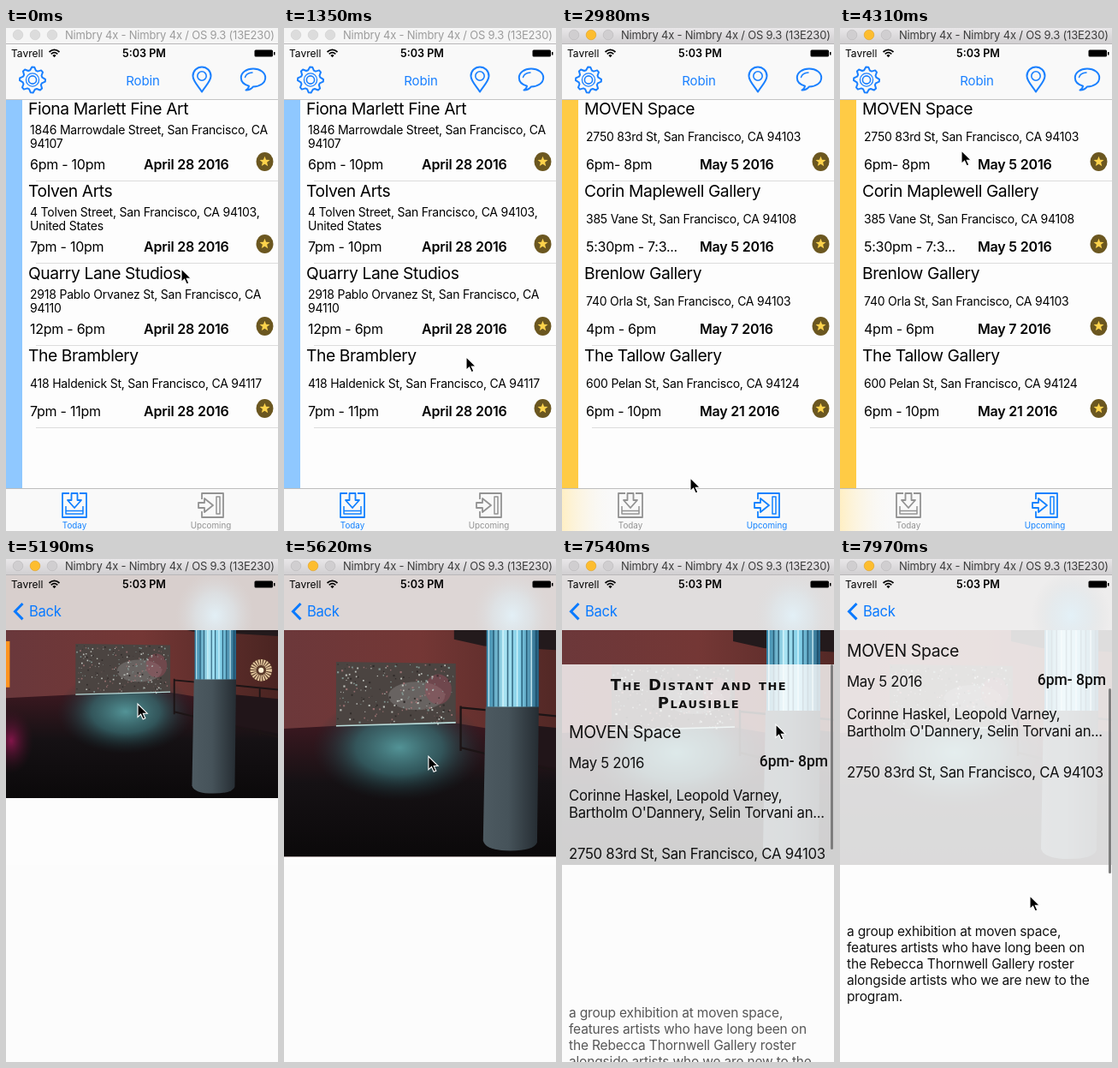
These frames come from a looping animation (318x587 px, 8 s). An HTML page:

```html
<!DOCTYPE html>
<html lang="en">
<head>
<meta charset="utf-8">
<title>Gallery openings app</title>
<style>
html, body { margin: 0; width: 100%; height: 100%; overflow: hidden; background: #fdfdfd; }
svg { display: block; width: 318px; height: 587px; }
text { font-family: Inter, "Liberation Sans", sans-serif; white-space: pre; }
.win { font-size: 13px; letter-spacing: -.2px; }
.net { font-size: 12px; }
.clock { font-size: 12.6px; font-weight: 600; text-anchor: middle; }
.user { font-size: 15px; letter-spacing: -.1px; text-anchor: middle; fill: #1a80ff; }
.back { font-size: 16.6px; letter-spacing: -.3px; fill: #0a7aff; }
.head { font-size: 19.3px; letter-spacing: -.42px; }
.addr { font-size: 14px; letter-spacing: -.22px; }
.hours { font-size: 16px; letter-spacing: -.25px; }
.date { font-size: 16px; font-weight: 600; letter-spacing: -.2px; }
.tab { font-size: 9.8px; text-anchor: middle; stroke: none; fill: currentColor; }
.show { font: bold 18px "DejaVu Sans", sans-serif; font-variant: small-caps; letter-spacing: 1.5px; text-anchor: middle; }
.place { font-size: 19.5px; letter-spacing: -.4px; }
.info { font-size: 16.8px; letter-spacing: -.3px; }
.open { font: 500 17.5px Roboto, sans-serif; text-anchor: end; }
.body { font-size: 15.5px; letter-spacing: -.17px; }
.line { fill: none; stroke: #1a80ff; stroke-width: 2; stroke-linejoin: round; stroke-linecap: round; }
.icon { fill: none; stroke: currentColor; stroke-width: 2; stroke-linejoin: round; }
</style>
</head>
<body>
<svg id="stage" viewBox="0 0 318 587" xmlns="http://www.w3.org/2000/svg"></svg>
<script>
const LOOP = 8000, STEP = 147.5;
const TABS = { today: 'Today', next: 'Upcoming' };

const today = [
  ['Fiona Marlett Fine Art', ['1846 Marrowdale Street, San Francisco, CA', '94107'], '6pm - 10pm', 'April 28 2016'],
  ['Tolven Arts', ['4 Tolven Street, San Francisco, CA 94103,', 'United States'], '7pm - 10pm', 'April 28 2016'],
  ['Quarry Lane Studios', ['2918 Pablo Orvanez St, San Francisco, CA', '94110'], '12pm - 6pm', 'April 28 2016'],
  ['The Bramblery', ['418 Haldenick St, San Francisco, CA 94117'], '7pm - 11pm', 'April 28 2016']
];
const upcoming = [
  ['MOVEN Space', ['2750 83rd St, San Francisco, CA 94103'], '6pm- 8pm', 'May 5 2016'],
  ['Corin Maplewell Gallery', ['385 Vane St, San Francisco, CA 94108'], '5:30pm - 7:3...', 'May 5 2016'],
  ['Brenlow Gallery', ['740 Orla St, San Francisco, CA 94103'], '4pm - 6pm', 'May 7 2016'],
  ['The Tallow Gallery', ['600 Pelan St, San Francisco, CA 94124'], '6pm - 10pm', 'May 21 2016']
];

// Motion tables: [step, value...]
const CURSOR = [[0, 205, 281], [3, 205, 281], [4, 207, 256], [5, 203, 325], [8, 203, 325],
  [12, 243, 560], [16, 243, 560], [20, 150, 525], [24, 82, 474], [27, 156, 300], [29, 142, 143],
  [30, 142, 143], [32, 154, 169], [36, 154, 169], [45, 221, 445], [46, 221, 445], [51, 250, 193], [54, 222, 393]];
const SCROLL = [[46, 0], [47, 20], [48, 62], [51, 234], [52, 281], [53, 311], [54, 329]];
const NAV = [[35, 216, 207, 205], [45, 233, 230, 230], [51, 224, 221, 221], [54, 238, 237, 237]];
// Detail rows: [fade start, fade length]
const FADES = [[41, 5], [41, 5], [42.5, 5], [44, 5], [44, 5], [47.5, 5]];

const clamp = v => Math.max(0, Math.min(1, v));
const ease = v => 1 - (1 - clamp(v)) ** 3;
const times = (n, fn) => Array.from({ length: n }, (_, i) => fn(i)).join('');
const text = (cls, x, y, s, extra = '') => `<text class="${cls}" x="${x}" y="${y}" ${extra}>${s}</text>`;
const rect = (x, y, w, h, fill, extra = '') => `<rect x="${x}" y="${y}" width="${w}" height="${h}" fill="${fill}" ${extra}/>`;

function at(keys, k) {
  let i = 0;
  while (i < keys.length - 1 && keys[i + 1][0] <= k) i++;
  const a = keys[i], b = keys[i + 1];
  if (!b || k <= a[0]) return a.slice(1);
  const f = (k - a[0]) / (b[0] - a[0]);
  return a.slice(1).map((v, j) => v + (b[j + 1] - v) * f);
}

function ring(n, radius, cx, cy) {
  return times(n, i => {
    const a = (i - .25) / n * 2 * Math.PI - Math.PI / 2, r = radius(i);
    return `${(cx + r * Math.cos(a)).toFixed(1)},${(cy + r * Math.sin(a)).toFixed(1)} `;
  });
}

function row([name, lines, hours, date], i) {
  const y = 83 + 96 * i;
  const first = lines.length > 1 ? 40.5 : 49;
  return text('head', 26, y + 18, name) +
    lines.map((s, j) => text('addr', 28, y + first + 16.5 * j, s)).join('') +
    text('hours', 28, y + 82, hours) + text('date', 161, y + 82, date) +
    `<ellipse cx="302.5" cy="${y + 73}" rx="10" ry="11" fill="#6b5720"/>
    <polygon points="${ring(10, j => j % 2 ? 2.7 : 6.3, 302.5, y + 73)}" fill="#fdd34c" transform="rotate(9 302.5 ${y + 73})"/>`;
}

const list = (id, rows, color) =>
  `<g id="${id}">${rect(0, 83, 19, 455, color)}${rows.map(row).join('')}</g>`;

function speckles() {
  let seed = 7;
  const rnd = () => (seed = seed * 16807 % 2147483647) / 2147483647;
  const colors = ['#d8dcd6', '#8fa9a4', '#a8787a', '#2b2625'];
  return times(230, i => {
    const s = .8 + rnd() * 1.5;
    return rect((59 + rnd() * 140).toFixed(1), (125 + rnd() * 72).toFixed(1), s.toFixed(1), s.toFixed(1), colors[i % 4], 'opacity=".8"');
  });
}

const photo = `<g id="photo">
  ${rect(-60, 19, 440, 338, 'url(#wall)')}
  <path d="M200 83H380V112L236 104L200 96Z" fill="#231a1c"/>
  <path d="M-60 206L58 200L204 197L380 226V357H-60Z" fill="url(#floor)"/>
  <ellipse cx="134" cy="226" rx="104" ry="64" fill="url(#pool)"/>
  <ellipse cx="-40" cy="270" rx="34" ry="50" fill="url(#pink)"/>
  <path d="M-60 19H380V198L204 196L58 200L-60 206Z" fill="none"/>
  ${rect(-60, 119, 18, 70, '#ff9420')}
  <path d="M58 123L202 125V196L58 200Z" fill="#4b4441"/>
  <ellipse cx="155" cy="164" rx="34" ry="17" fill="#8c8b87" opacity=".45"/>
  <ellipse cx="181" cy="156" rx="16" ry="18" fill="#9c4d5c" opacity=".45"/>
  ${speckles()}
  <path d="M58 200L202 196" stroke="#b9dcda" stroke-width="1.6"/>
  <path d="M208 176V230M208 178L240 181M300 186L380 194M208 226L380 268M338 190V262" fill="none" stroke="#1c1415" stroke-width="2.4"/>
  <path d="M300 200L380 208V262L300 246Z" fill="#211519"/>
  <circle cx="340" cy="163" r="17" fill="#5a3a2a"/>
  <circle cx="340" cy="163" r="12" fill="none" stroke="#e2c69d" stroke-width="9" stroke-dasharray="2.2 1.3"/>
  <circle cx="340" cy="163" r="4" fill="#fff1d5"/>
  ${rect(239, 19, 63, 159, 'url(#lamp)')}
  ${times(11, i => rect(241 + i * 5.7, 60, 1.6, 117, i % 3 ? '#16455f' : '#e0fbff', 'opacity=".75"'))}
  <path d="M238 177H302L300 340Q296 350 268 350Q238 350 235 338Z" fill="url(#column)"/>
</g>`;

const detail = `<g id="detail">
  ${rect(0, 19, 318, 568, '#fdfdfd')}
  ${photo}
  <rect id="panel" x="0" width="318" height="900" fill="#fdfdfd"/>
  <g id="copy" fill="#111">
    <g>${text('show', 160, 387, 'The Distant and the')}${text('show', 160, 408, 'Plausible')}</g>
    <g>${text('place', 8, 442.5, 'MOVEN Space')}</g>
    <g>${text('info', 8, 477.5, 'May 5 2016')}${text('open', 311, 476, '6pm- 8pm')}</g>
    <g>${text('info', 8, 516, 'Corinne Haskel, Leopold Varney,')}${text('info', 8, 536, "Bartholm O'Dannery, Selin Torvani an...")}</g>
    <g>${text('info', 8, 584, '2750 83rd St, San Francisco, CA 94103')}</g>
    <g>${['a group exhibition at moven space,', 'features artists who have long been on',
      'the Rebecca Thornwell Gallery roster', 'alongside artists who we are new to the', 'program.']
      .map((s, i) => text('body', 8, 768.5 + 19 * i, s)).join('')}</g>
  </g>
  <rect id="bar" x="314" width="3" height="216" rx="1.5" fill="#7d7d7d"/>
</g>`;

const navIcons = `<g id="navIcons">
  <polygon class="line" points="${ring(32, i => i % 4 < 2 ? 15 : 11.6, 31, 60.5)}"/>
  <circle class="line" cx="31" cy="60.5" r="7.6" stroke-width="1.2" style="stroke-width:1.3"/>
  <circle class="line" cx="31" cy="60.5" r="4.6" style="stroke-width:1.6"/>
  <path class="line" d="M229 74.5C225 68 218.5 62 218.5 56A10.5 10.5 0 0 1 239.5 56C239.5 62 233 68 229 74.5Z"/>
  <circle class="line" cx="229" cy="56" r="5.2" style="stroke-width:1.6"/>
  <path class="line" d="M284 67.6C278 66 274.8 62.5 274.8 58C274.8 52 281 47.6 289 47.6S303.2 52 303.2 58S297 68.4 289 68.4C287 71 283.5 72.6 280.5 72.6C283 71 284 69.5 284 67.6Z"/>
  <path class="line" d="M279.5 57.5Q281 52.5 288 52" style="stroke-width:1.5"/>
  <text id="user" class="user" x="160" y="66.5"></text>
</g>`;

const tabs = `<g id="tabs">
  ${rect(0, 538, 318, 49, '#f9f9f9')}
  <rect id="glow" x="0" y="538" width="62" height="49" fill="url(#amber)"/>
  ${rect(0, 537, 318, 1, '#bdbdbd')}
  <g id="todayTab"><path class="icon" d="M74 543H66V571H94V543H86M76.5 543V551H72L80 560L88 551H83.5V543Z" style="stroke-width:1.8"/>
    <path class="icon" d="M70 558V567H90V558M70 563.5H90" style="stroke-width:1.5"/>${text('tab', 80, 583.5, TABS.today)}</g>
  <g id="nextTab"><path class="icon" d="M229 550V543H254V571H229V564M225 554V560H232V565L242 557L232 549V554Z" style="stroke-width:1.8"/>
    <path class="icon" d="M246 547H250V567H246Z" style="stroke-width:1.5"/>${text('tab', 239.5, 583.5, TABS.next)}</g>
</g>`;

const status = `
  ${text('net', 6, 33.5, 'Tavrell')}${text('clock', 161.5, 33.5, '5:03 PM')}
  <g fill="none" stroke="#000" stroke-width="1.7"><path d="M50.5 28Q56.500 22.600 62.500 28M52.700 30.300Q56.500 27 60.300 30.300"/></g>
  <path d="M54.400 32.000Q56.500 30.200 58.600 32.000L56.500 34.200Z"/>
  <rect x="290.500" y="25.500" width="21.500" height="8" rx="1.500"/>${rect(313, 28, 1.5, 3.5, '#000')}
  <g id="spin">${times(12, i => `<path d="M73.500 26.500V24.300" stroke="#333" stroke-opacity="${(.2 + i * .06).toFixed(2)}" stroke-width="1.100" transform="rotate(${i * 30} 73.500 29)"/>`)}</g>`;

const stops = list => list.map(([o, c, a = 1]) => `<stop offset="${o}" stop-color="${c}" stop-opacity="${a}"/>`).join('');
const linear = (id, list, down) => `<linearGradient id="${id}" ${down ? 'x2="0" y2="1"' : ''}>${stops(list)}</linearGradient>`;
const radial = (id, list) => `<radialGradient id="${id}">${stops(list)}</radialGradient>`;

const stage = document.getElementById('stage');
stage.innerHTML = `<defs>
  ${linear('chrome', [[0, '#e9e7e9'], [1, '#d1cfd1']], true)}
  ${linear('wall', [[0, '#69383c'], [.5, '#743735'], [1, '#472320']])}
  ${linear('floor', [[0, '#3b1820'], [.45, '#151114'], [1, '#0b090a']], true)}
  ${linear('lamp', [[0, '#2f7fa3'], [.35, '#a9e4f3'], [.65, '#7fcce6'], [1, '#245f80']])}
  ${linear('column', [[0, '#4d5a61'], [.45, '#46535a'], [1, '#252c32']])}
  ${linear('amber', [[0, '#ffefc4'], [1, '#f9f9f9', 0]])}
  ${radial('pool', [[0, '#559a9d', .95], [.5, '#366b70', .75], [1, '#1a2e33', 0]])}
  ${radial('pink', [[0, '#8f1650', .9], [1, '#3b1020', 0]])}
  ${radial('halo', [[0, '#e3f1f8', .95], [.5, '#dfe9ee', .6], [1, '#dcdcdc', 0]])}
  <clipPath id="screen"><rect x="0" y="19" width="318" height="568"/></clipPath>
  <clipPath id="navClip"><rect x="0" y="19" width="318" height="64"/></clipPath>
</defs>
${rect(0, 0, 318, 587, '#fdfdfd')}
<g clip-path="url(#screen)">
  <g id="master">
    ${rect(0, 83, 318, 504, '#fdfdfd')}
    <rect id="picked" x="0" y="83" width="318" height="95" fill="#d9d9d9"/>
    ${times(4, i => rect(35, 178 + 96 * i, 283, 1, '#dcdcdc'))}
    ${list('todayList', today, '#8fc8ff')}${list('nextList', upcoming, '#ffcb45')}
    ${tabs}
  </g>
  ${detail}
  ${rect(0, 19, 318, 64, '#f9f9f9')}
  <rect id="navLine" x="0" y="83" width="318" height="1" fill="#c4c4c4"/>
  <g id="navTint" clip-path="url(#navClip)"><rect id="navFill" x="0" y="19" width="318" height="64"/>
    <ellipse id="halo" cx="244" cy="66" rx="46" ry="52" fill="url(#halo)"/></g>
  ${navIcons}
  <g id="back"><path d="M19.500 52L10.500 61.200L19.500 70.400" fill="none" stroke="#0a7aff" stroke-width="3"/>${text('back', 27, 67, 'Back')}</g>
  ${status}
</g>
<rect id="chromeBar" x="0" y="0" width="318" height="18"/>
${rect(0, 18, 318, 1, '#b9b7b9')}
${times(3, i => `<circle class="dot" cx="${14 + 20 * i}" cy="8" r="5.800" stroke-width=".600"/>`)}
<text id="winTitle" class="win" x="69" y="13">Nimbry 4x - Nimbry 4x / OS 9.3 (13E230)</text>
<path id="cursor" d="M0 0V15.500L3.600 12.200L6.200 18L8.900 16.800L6.300 11.200H11.200Z" fill="#000" stroke="#fff" stroke-width="1.100"/>`;

const el = {};
stage.querySelectorAll('[id]').forEach(n => el[n.id] = n);
const dots = [...stage.querySelectorAll('.dot')];
const copyRows = [...el.copy.children];
const set = (id, name, value) => el[id].setAttribute(name, value);
const show = (id, on) => set(id, 'visibility', on ? 'visible' : 'hidden');
const move = (id, x, y) => set(id, 'transform', `translate(${x} ${y})`);

function draw(k) {
  const active = k >= 12, second = k >= 14, loaded = k >= 18;

  set('chromeBar', 'fill', active ? 'url(#chrome)' : '#f5f5f5');
  set('winTitle', 'fill', active ? '#3c3c3c' : '#9c9c9c');
  dots.forEach((d, i) => {
    const amber = active && i === 1;
    d.setAttribute('fill', amber ? '#fdbd2f' : active ? '#d0ced0' : '#dcdcdc');
    d.setAttribute('stroke', amber ? '#dfa023' : active ? '#b9b7b9' : '#cfcfcf');
  });

  show('todayList', !second);
  show('nextList', loaded);
  show('glow', loaded);
  show('picked', k === 31 || k === 32);
  show('spin', k === 1 || (second && !loaded));
  set('spin', 'transform', `rotate(${k * 60} 73.5 29)`);
  el.user.textContent = second && !loaded ? 'Login' : 'Robin';
  set('todayTab', 'color', second ? '#929292' : '#1181ff');
  set('nextTab', 'color', second ? '#1181ff' : '#929292');

  // Push to the detail page
  const push = ease((k - 31) / 3.5);
  move('master', -95 * push, 0);
  move('detail', 318 * (1 - push), 0);
  show('detail', push > 0);
  set('navIcons', 'opacity', 1 - push);
  set('navTint', 'opacity', push);
  set('navLine', 'opacity', 1 - push);
  set('back', 'opacity', push);
  move('back', 110 * (1 - push), 0);

  // Header photo grows around its top centre
  const zoom = 1 / 1.3 + (1 - 1 / 1.3) * ease((k - 35) / 6);
  set('photo', 'transform', `translate(159 19) scale(${zoom}) translate(-159 -19)`);
  set('halo', 'cx', 159 + 111 * zoom);
  set('navFill', 'fill', `rgb(${at(NAV, k).map(Math.round)})`);

  const [y] = at(SCROLL, k);
  move('copy', 0, -y);
  set('panel', 'y', 357 - y);
  set('panel', 'opacity', .8 + .06 * clamp((y - 200) / 129));
  copyRows.forEach((g, i) => g.setAttribute('opacity', clamp((k - FADES[i][0]) / FADES[i][1])));
  show('bar', k >= 47);
  set('bar', 'y', Math.max(85, 123 + (y - 234) * .295));

  move('cursor', ...at(CURSOR, k));
}

let last = -1;
function tick() {
  const k = Math.floor(performance.now() % LOOP / STEP);
  if (k !== last) draw(last = k);
  requestAnimationFrame(tick);
}
tick();
</script>
</body>
</html>
```
